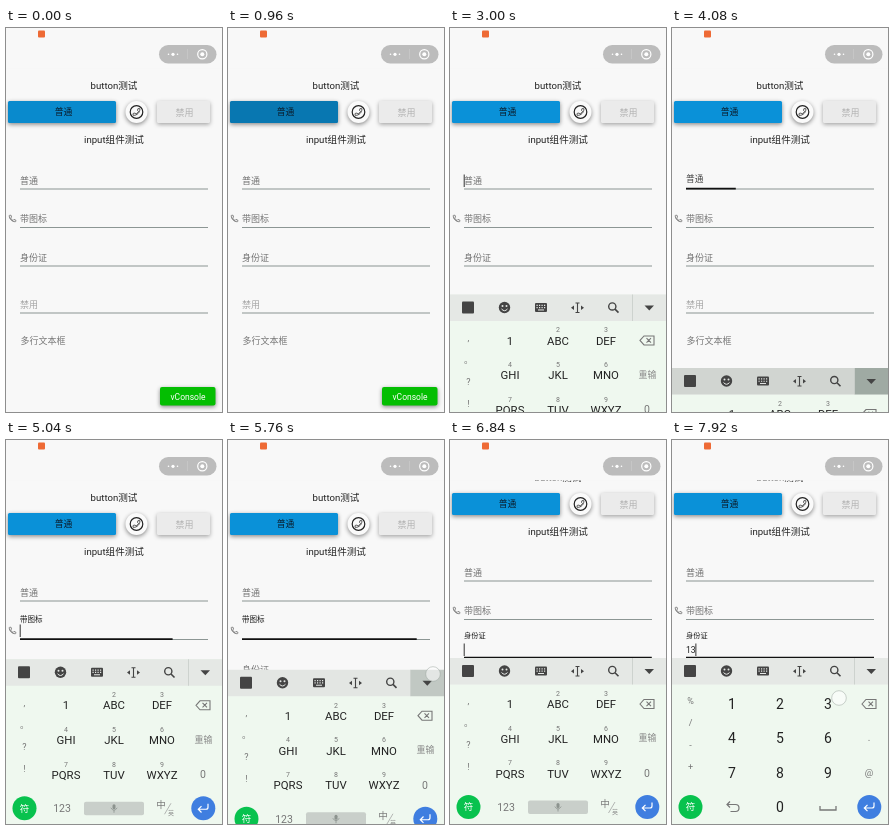
Recreate the animation shown at these times as an HTML page with a canvas. Size 216 by 384 pixels, loop 8 s.

```html
<!DOCTYPE html>
<html lang="zh-CN">
<head>
<meta charset="utf-8">
<title>Form components</title>
<style>
html, body { margin: 0; width: 100%; height: 100%; overflow: hidden; background: #f8f8f8; }
canvas { display: block; width: 216px; height: 384px; }
</style>
</head>
<body>
<canvas id="stage"></canvas>
<script>
const W = 216, H = 384, LOOP = 8000, BG = '#f8f8f8', INK = '#444';
const canvas = document.getElementById('stage');
const c = canvas.getContext('2d');
const dpr = window.devicePixelRatio || 1;
canvas.width = W * dpr;
canvas.height = H * dpr;

const clamp = x => Math.max(0, Math.min(1, x));
const mix = (a, b, p) => a + (b - a) * p;
const easeOut = x => 1 - (1 - clamp(x)) ** 3;
const smooth = x => { x = clamp(x); return x * x * (3 - 2 * x); };

// Each input session: which field, when its keyboard opens and closes, page scroll
const sessions = [
  { field: 0, open: 2900, close: 3922, scroll: 0 },
  { field: 1, open: 4800, close: 5722, scroll: 0 },
  { field: 2, open: 6480, close: 9999, scroll: 20 }
];
const fields = [['普通', 153, 161], ['带图标', 191, 199.5], ['身份证', 230, 238], ['禁用', 276.5, 285]];
const taps = [[205, 234, 5640, 5800], [56, 367, 7020, 7140], [60, 261, 7460, 7580], [167, 258, 7820, 7980]];
const NUMPAD_AT = 7140, KEY_1 = 7560, KEY_3 = 7880;

const phone = new Path2D('M6.6 10.8c1.4 2.8 3.8 5.1 6.6 6.6l2.2-2.2c.3-.3.7-.4 1-.2 1.1.4 2.3.6 3.6.6.6 0 1 .4 1 1V20c0 .6-.4 1-1 1C10.600 21 3 13.400 3 4c0-.6.4-1 1-1h3.500c.6 0 1 .4 1 1 0 1.300.2 2.500.6 3.600.1.300 0 .7-.3 1z');

function text(s, x, y, size, color, align = 'center', weight = 400) {
  c.font = `${weight} ${size}px Roboto, "Noto Sans CJK SC", "Noto Sans CJK", sans-serif`;
  c.textAlign = align;
  c.fillStyle = color;
  c.fillText(s, x, y + size * 0.36);
}

function rect(x, y, w, h, color, r = 0) {
  c.fillStyle = color;
  c.beginPath();
  c.roundRect(x, y, w, h, r);
  c.fill();
}

function disc(x, y, r, color) {
  c.fillStyle = color;
  c.beginPath();
  c.arc(x, y, r, 0, 7);
  c.fill();
}

function ring(x, y, r, color, width) {
  c.strokeStyle = color;
  c.lineWidth = width;
  c.beginPath();
  c.arc(x, y, r, 0, 7);
  c.stroke();
}

function line(path, color, width = 1) {
  c.strokeStyle = color;
  c.lineWidth = width;
  c.stroke(new Path2D(path));
}

function shape(path, color) {
  c.fillStyle = color;
  c.fill(new Path2D(path));
}

function raised(draw, alpha = 0.45) {
  c.save();
  c.shadowColor = `rgba(0,0,0,${alpha})`;
  c.shadowBlur = 4 * dpr;
  c.shadowOffsetY = 1.5 * dpr;
  draw();
  c.restore();
}

function handset(x, y, scale, flip) {
  c.save();
  c.translate(x, y);
  c.scale(flip ? -scale : scale, scale);
  c.translate(-12, -12);
  c.lineWidth = 2;
  c.strokeStyle = flip ? '#222' : '#555';
  c.stroke(phone);
  c.restore();
}

function buttons(t) {
  const press = mix(0.05, 0.18, smooth((t - 650) / 250)) * (1 - smooth((t - 1300) / 400));
  raised(() => rect(2, 73, 108, 22, '#0a91d8', 1.5));
  rect(2, 73, 108, 22, `rgba(0,0,0,${press})`, 1.5);
  text('普通', 57.5, 84.3, 8.8, '#0b1c2b', 'center', 500);
  raised(() => disc(130.500, 84, 11, '#fafafa'));
  ring(130.500, 84, 6.3, '#222', 1.2);
  handset(130.500, 84, 0.38, true);
  raised(() => rect(151, 73, 53, 22, '#ebebeb', 1.5), 0.35);
  text('禁用', 178.500, 84.3, 9, '#b2b2b2');
}

// How far a field's label has floated and its underline has grown
function fieldState(i, t) {
  const s = sessions.find(s => s.field === i);
  if (!s) return { line: 0, label: 0, focus: false };
  const out = smooth((t - s.close) / 240);
  const grow = easeOut((t - s.open - 130) / 260);
  return {
    line: grow * (1 - out),
    label: grow * (1 - out ** 0.6),
    focus: t > s.open + 60 && t < s.close,
    since: t - s.open
  };
}

function drawField(i, t) {
  const [name, y, base] = fields[i];
  const f = fieldState(i, t);
  const disabled = i === 3;
  const shade = Math.round(mix(disabled ? 165 : 115, 25, Math.min(1, f.label * 3)));
  text(name, 14, y - 15 * f.label, mix(9, 7.2, f.label), `rgb(${shade},${shade},${shade})`, 'left');
  rect(14, base - 0.5, 188, 0.9, '#8c9694');
  if (f.line > 0) rect(14, base - 1.3, 188 * f.line, 1.8, '#111');
  const typed = i !== 2 ? '' : t >= KEY_3 ? '13' : t >= KEY_1 ? '1' : '';
  if (typed) text(typed, 14, y, 8.6, '#222', 'left');
  const recent = t >= KEY_1 && t - KEY_1 < 440;
  if (f.focus && (f.since % 1000 < 600 || recent)) {
    const x = 13.700 + (typed ? c.measureText(typed).width : 0);
    rect(x, y - 6.500, 1, 12.500, '#333');
  }
}

function page(t, scroll) {
  c.save();
  c.translate(0, -scroll);
  text('button测试', 108, 57.3, 9.6, '#222');
  buttons(t);
  text('input组件测试', 108, 111.3, 9.6, '#222');
  fields.forEach((_, i) => drawField(i, t));
  handset(6.500, 190.500, 0.36, false);
  text('多行文本框', 14.500, 312.500, 9, '#777', 'left');
  c.restore();

  rect(0, 0, W, 40.500, BG);
  rect(32, 2.500, 7, 7, '#ee6a35', 1);
  rect(153, 17, 57.500, 18.500, '#bcbcbc', 9.2);
  [[162.500, 0.8], [167, 1.6], [171.500, 0.8]].forEach(([x, r]) => disc(x, 26.300, r, '#fff'));
  rect(181.500, 21, 0.5, 10, '#cfcfcf');
  ring(196.300, 26.300, 4.600, '#fff', 1.2);
  disc(196.300, 26.300, 2, '#fff');
  raised(() => rect(154, 359, 55.500, 18.500, '#04be02', 2));
  text('vConsole', 182, 368.500, 8.5, '#fff');
}

function toolbar(press) {
  rect(0, 218, W, 26.500, '#e5e8e5');
  if (press !== null) {
    rect(0, 218, W, 26.500, `rgba(0,20,10,${0.12 * press})`);
    rect(183, 218, 33, 26.500, `rgba(30,60,45,${0.16 + 0.16 * press})`);
  }
  rect(182, 218, 0.7, 26.500, '#c3c9c4');
  rect(12, 225, 12, 12, INK, 1);
  disc(54.500, 231, 5.700, INK);
  disc(52.500, 229.500, 1, '#e5e8e5');
  disc(56.500, 229.500, 1, '#e5e8e5');
  line('M51.500 232.500Q54.500 236 57.500 232.500', '#e5e8e5');
  rect(85, 226.500, 12, 9, INK, 1);
  for (let i = 0; i < 8; i++) rect(86.500 + i % 4 * 2.500, 228.300 + (i >> 2) * 2.300, 1.2, 1.2, '#e5e8e5');
  rect(88, 233, 6, 1, '#e5e8e5');
  line('M125.500 226.500h4M127.500 226.500v9.500M125.500 236h4', INK, 1.1);
  shape('M124 229v4.500l-3-2.200zM131 229v4.500l3-2.200z', INK);
  ring(162.300, 230, 3.600, INK, 1.4);
  line('M165 232.700l3.500 3.500', INK, 1.600);
  shape('M194.500 229h9.500l-4.700 5z', INK);
}

function backspace() {
  line('M190 264l4-4.500h10v9h-10zM196.500 261.700l4.500 4.500M201 261.700l-4.500 4.500', '#777', 1.1);
}

function letterKeys() {
  [',', '。', '?', '!'].forEach((s, i) => text(s, 18.500, 261 + i * 22, 9, '#777'));
  ['1', 'ABC', 'DEF', 'GHI', 'JKL', 'MNO', 'PQRS', 'TUV', 'WXYZ'].forEach((s, i) => {
    const x = 60 + i % 3 * 48, y = 264 + Math.floor(i / 3) * 34.700;
    text(s, x, y, 11.4, '#222');
    if (i) text(i + 1, x, y - 10.500, 7, '#777');
  });
  text('重输', 197.500, 298, 9, '#888');
  text('0', 197, 333, 10.500, '#777');
  text('123', 56, 367, 10.500, '#777');
  rect(78, 360.500, 60, 13.500, '#c9cfca', 2);
  rect(106.500, 363, 3, 5, '#8c938e', 1.5);
  line('M104.800 366.500q3.200 5 6.400 0M108 369v2.500', '#8c938e', 0.8);
  text('中', 155, 363.500, 9.5, '#777');
  text('英', 165, 371.500, 6, '#888');
  line('M158.500 373l6.500-11', '#999', 0.7);
}

function numberKeys() {
  ['%', '/', '-', '+'].forEach((s, i) => text(s, 18.500, 260.500 + i * 22, 9, '#777'));
  for (let i = 0; i < 9; i++) text(i + 1, 60 + i % 3 * 48, 263.500 + Math.floor(i / 3) * 34.700, 14, '#222');
  text('0', 108, 367, 14, '#222');
  text('.', 197, 297, 10, '#777');
  text('@', 197, 333, 9.5, '#777');
  line('M58 361.500l-3 3 3 3M55 364.500h8.500a3.400 3.400 0 0 1 0 7h-5', '#777', 1.2);
  line('M148 366v4h16v-4', '#777', 1.3);
}

function keyboard(t, shown, press) {
  if (shown <= 0) return;
  c.save();
  c.translate(0, 166 * (1 - shown));
  rect(0, 218, W, 166, '#eff8ef');
  toolbar(press);
  backspace();
  (t >= NUMPAD_AT ? numberKeys : letterKeys)();
  disc(18.500, 367, 12, '#08c24e');
  text('符', 18.500, 367, 9.5, '#fff');
  disc(197.300, 367, 12, '#3f7ee0');
  line('M202 362.500v3.500q0 2-2 2h-7.500M195.500 364.800l-3.200 3.200 3.200 3.200', '#fff', 1.2);
  c.restore();
}

function draw(t) {
  c.setTransform(dpr, 0, 0, dpr, 0, 0);
  rect(0, 0, W, H, BG);
  const s = sessions.find(s => t >= s.open && t < s.close + 240);
  const out = s ? smooth((t - s.close) / 240) : 0;
  const shown = s ? easeOut((t - s.open) / 300) * (1 - out) : 0;
  page(t, s ? s.scroll * shown : 0);
  keyboard(t, shown, s && t > s.close - 100 ? out : null);
  for (const [x, y, from, to] of taps) {
    if (t < from || t >= to) continue;
    disc(x, y, 7.300, 'rgba(255,255,255,.55)');
    ring(x, y, 7.300, 'rgba(150,160,155,.6)', 0.8);
  }
}

function tick() {
  draw(performance.now() % LOOP);
  requestAnimationFrame(tick);
}
tick();
</script>
</body>
</html>
```
